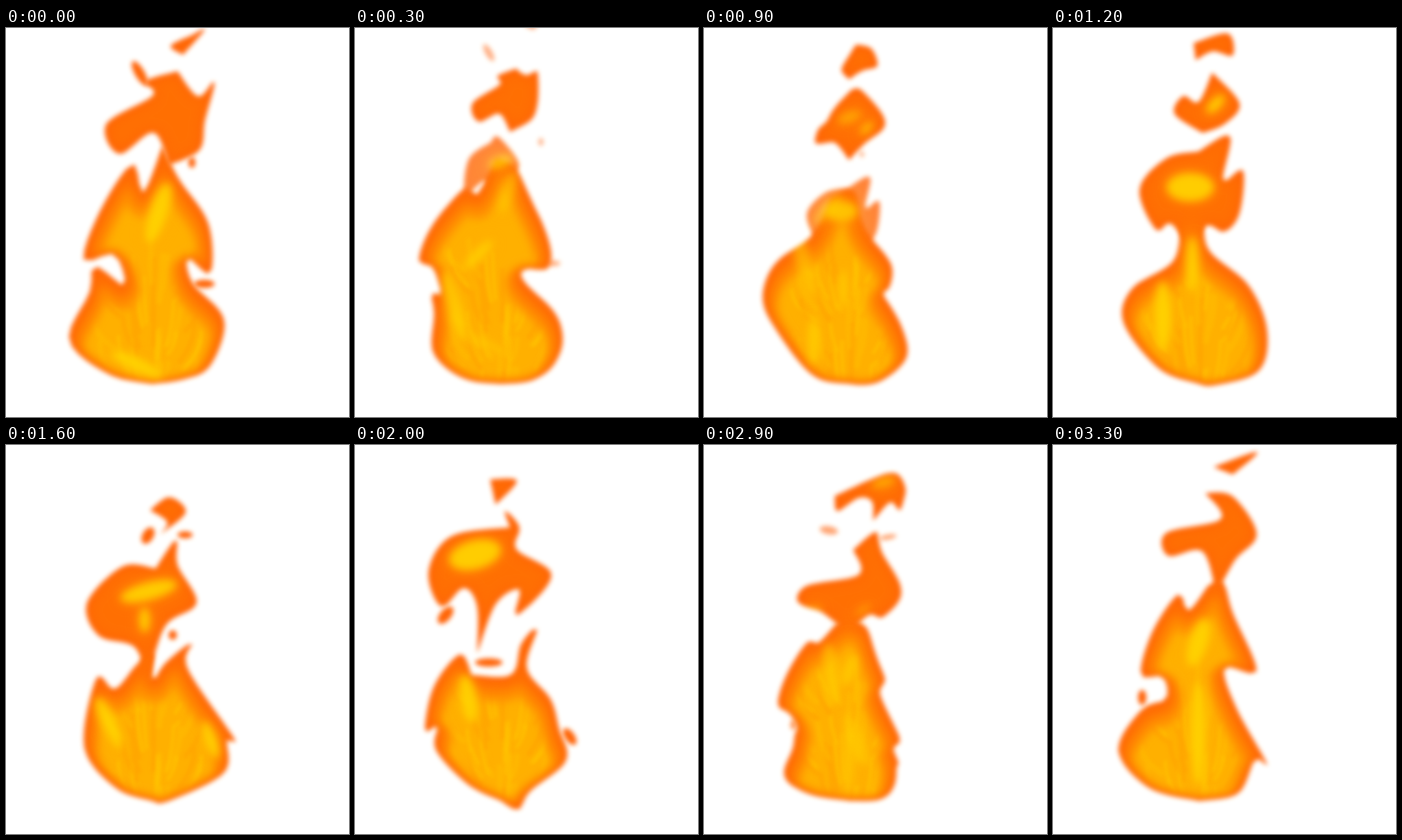
Recreate the animation shown at these times as an HTML page with a canvas. Size 500x567 px, loop 3.4 s.

```html
<!DOCTYPE html>
<html lang="en">
<head>
<meta charset="utf-8">
<title>Flame</title>
<style>
  html, body { margin: 0; width: 100%; height: 100%; overflow: hidden; background: #fff; }
  canvas { display: block; }
</style>
</head>
<body>
<canvas id="stage" width="500" height="567"></canvas>
<script>
const STEP = 100, COUNT = 34, SAMPLES = 48;
const FOOT = '213 519 ';
const stage = document.getElementById('stage');
const ctx = stage.getContext('2d');
const inner = document.createElement('canvas');
inner.width = stage.width;
inner.height = stage.height;
const ink = inner.getContext('2d');
const poses = [];

const numbers = text => text.trim().split(/\s+/).map(Number);

// Smooth curve through the points, resampled at even distances.
function sample(pts) {
  const line = [], last = pts.length - 1;
  for (let i = 0; i < last; i++) {
    const a = pts[Math.max(i - 1, 0)], b = pts[i], c = pts[i + 1], d = pts[Math.min(i + 2, last)];
    for (let k = 0; k < 8; k++) {
      const t = k / 8;
      line.push([0, 1].map(j => b[j] + t / 2 * (c[j] - a[j] +
        t * (2 * a[j] - 5 * b[j] + 4 * c[j] - d[j] + t * (3 * (b[j] - c[j]) + d[j] - a[j])))));
    }
  }
  line.push(pts[last]);
  const len = [0];
  for (let i = 1; i < line.length; i++)
    len.push(len[i - 1] + Math.hypot(line[i][0] - line[i - 1][0], line[i][1] - line[i - 1][1]));
  const out = [];
  for (let s = 0, i = 1; s < SAMPLES; s++) {
    const want = len[len.length - 1] * s / (SAMPLES - 1);
    while (i < len.length - 1 && len[i] < want) i++;
    const t = (want - len[i - 1]) / (len[i] - len[i - 1] || 1);
    out.push([0, 1].map(j => line[i - 1][j] + t * (line[i][j] - line[i - 1][j])));
  }
  return out;
}

// An outline runs from its foot up the left side to the tip, then | down to the foot again.
function outline(text) {
  const [left, right] = text.split('|').map(half => {
    const n = numbers(half), pts = [];
    for (let i = 0; i < n.length; i += 2) pts.push([n[i], n[i + 1]]);
    return pts;
  });
  return [...sample(left), ...sample([left[left.length - 1], ...right, left[0]])];
}

// Tilted oval: centre, radii, degrees.
function oval(text) {
  const [x, y, rx, ry, deg] = numbers(text), tilt = deg * Math.PI / 180;
  return Array.from({ length: 2 * SAMPLES }, (_, i) => {
    const a = Math.PI * i / SAMPLES, p = rx * Math.cos(a), q = ry * Math.sin(a);
    return [x + p * Math.cos(tilt) - q * Math.sin(tilt), y + p * Math.sin(tilt) + q * Math.cos(tilt)];
  });
}

// Parts that share a name in neighbouring poses morph into each other.
function pose(at, parts, bits, lights) {
  const body = {}, glow = {};
  for (const name in parts) body[name] = outline((name === 'base' ? FOOT : '') + parts[name]);
  bits.split(',').forEach((text, i) => { if (text) body[at + '/' + i] = oval(text); });
  lights.split(',').forEach((text, i) => { glow[at + '/' + i] = oval(text); });
  poses.push({ at, body, glow });
}

pose(0, {
  base: '150 505 92 455 122 385 126 348 144 355 174 376 158 330 113 338 138 265 184 198 200 240 228 172|252 220 295 285 298 358 265 335 272 372 318 425 298 492 260 512',
  low: '237 200 215 152 165 184 146 140 215 98 202 78 250 63|280 100 304 78 290 135 282 178',
  top: '258 39 240 26 272 10|290 2'
}, '271 196 5 8 0,289 373 15 6 0,195 66 7 20 -30', '222 270 13 45 18,190 490 40 10 25');

pose(6, {
  base: '155 512 98 432 70 375 85 310 140 264 184 208|222 195 240 260 272 325 245 364 216 362 265 410 294 460 262 513',
  mid: '205 232 186 195 145 222 152 150 198 115|214 104 257 162 222 195',
  low: '215 103 194 85 220 55|214 36 244 72'
}, '230 214 5 6 0', '145 370 15 75 -15,212 160 26 11 -20,180 295 12 40 45');

pose(12, {
  base: '155 497 103 430 115 380 175 340 186 285|216 280 228 325 285 375 312 440 300 500 235 521',
  top: '200 325 172 285 150 294 126 235 165 190 212 180|258 157 248 222 277 207 272 270 250 297 224 288',
  mid: '218 153 177 125 190 99 212 108 232 65|272 110 250 140',
  low: '208 47 205 22|255 8 262 40 233 34'
}, '', '160 420 12 50 0,203 345 8 40 0,200 232 34 20 0,237 111 17 7 -45');

pose(16, {
  base: '160 500 114 440 132 340 158 356 186 325|214 300 214 343 232 318 272 288 264 325 334 430 322 430 318 478 235 520',
  top: '205 348 188 295 135 278 118 230 170 177 218 180|248 138 250 175 278 230 235 260 215 310',
  mid: '225 130 235 112 210 95|238 76 262 98'
}, '207 132 8 13 30,261 131 11 5 0,243 277 6 7 0', '208 213 42 12 -15,202 255 7 18 0,150 405 10 40 -25,298 430 8 28 -20');

pose(20, {
  base: '165 495 118 445 120 410 102 416 115 352 153 305 170 335|228 335 242 290 266 267 250 325 285 370 297 412 308 460 255 505 238 532',
  top: '178 304 178 235 158 208 126 236 107 185 140 133 226 120|218 95 240 120 235 152 287 190 235 249 240 210 205 232',
  mid: '205 87 197 50|236 52'
}, '132 248 8 15 40,195 317 20 6 0,313 425 7 14 -35', '175 160 38 20 -15,165 370 12 35 -10');

pose(26, {
  base: '135 510 140 467 92 420 120 350 165 305|215 278 232 335 292 445 256 440 275 495 255 520',
  low: '190 317 125 305 118 268 212 250 214 215|244 165 245 205 285 275 256 314 232 292',
  top: '235 161 238 115 208 106 160 143 158 106|260 60 290 80 285 150 268 122'
}, '268 160 17 5 -10,182 150 18 8 10', '185 360 16 60 -5,222 455 16 55 -20,158 266 20 6 -8,232 266 18 4 -35,262 80 24 9 -15');

pose(33, {
  base: '140 500 95 445 130 385 165 370 160 338 128 335 145 272 183 217 197 242 226 205|248 200 262 245 297 330 250 325 268 385 313 467 295 458 270 508',
  low: '238 218 218 155 168 162 165 128 245 108 222 70|262 75 297 130 265 168',
  top: '262 43 234 32|298 10'
}, '130 368 6 11 0', '212 288 14 36 18,212 420 11 75 0');

function resize(pts, scale, dy) {
  const mid = [0, 1].map(j => pts.reduce((sum, p) => sum + p[j], 0) / pts.length);
  return pts.map(p => [mid[0] + (p[0] - mid[0]) * scale, mid[1] + (p[1] - mid[1]) * scale + dy]);
}

function toPath(pts) {
  const path = new Path2D();
  pts.forEach(p => path.lineTo(p[0], p[1]));
  path.closePath();
  return path;
}

// New parts swell up from below, leaving parts rise, shrink and fade.
function blend(from, to, u) {
  const parts = [];
  for (const name of new Set([...Object.keys(from), ...Object.keys(to)])) {
    const a = from[name], b = to[name];
    let pts, alpha = 1;
    if (a && b) pts = a.map((p, i) => [p[0] + (b[i][0] - p[0]) * u, p[1] + (b[i][1] - p[1]) * u]);
    else if (a) { pts = resize(a, 1 - 0.6 * u, -60 * u); alpha = 1 - u; }
    else { pts = resize(b, 0.4 + 0.6 * u, 70 * (1 - u)); alpha = Math.min(1, u * 1.6); }
    if (alpha > 0) parts.push({ name, alpha, path: toPath(pts) });
  }
  return parts;
}

function paint(parts, color, blur, strength = 1) {
  ctx.filter = `blur(${blur}px)`;
  ctx.fillStyle = color;
  for (const part of parts) {
    ctx.globalAlpha = part.alpha * strength;
    ctx.fill(part.path);
  }
}

// Brush marks that lean towards the foot and climb.
function brush(frame) {
  let seed = 7;
  const rnd = () => (seed = seed * 16807 % 2147483647) / 2147483647;
  ink.globalCompositeOperation = 'source-atop';
  ink.filter = 'blur(2.5px)';
  ink.globalAlpha = 0.28;
  ink.lineCap = 'round';
  ['#ffe600', '#ff9000', '#ffc800'].forEach((color, i) => {
    const marks = new Path2D();
    for (let k = 0; k < 15; k++) {
      const x = 213 + (rnd() - 0.5) * 170;
      const y = 290 + 200 * ((rnd() + 1 - frame * 2 / COUNT % 1) % 1);
      const size = 30 + 40 * rnd();
      marks.moveTo(x, y);
      marks.quadraticCurveTo(x, y + size / 2, x + (213 - x) * 0.35, y + size);
    }
    ink.strokeStyle = color;
    ink.lineWidth = 4 + 2 * i;
    ink.stroke(marks);
  });
}

// Fills a shape inset from its outline, lower at the foot so it stays bright there.
function paintInner(path, color, inset, blur, frame) {
  ink.save();
  ink.clearRect(0, 0, inner.width, inner.height);
  ink.translate(0, inset * 0.6);
  ink.fillStyle = color;
  ink.fill(path);
  if (frame !== undefined) brush(frame);
  ink.globalCompositeOperation = 'destination-out';
  ink.globalAlpha = 1;
  ink.filter = `blur(${blur}px)`;
  ink.lineJoin = 'round';
  ink.lineWidth = inset * 2;
  ink.strokeStyle = '#000';
  ink.stroke(path);
  ink.restore();
  ctx.filter = 'none';
  ctx.globalAlpha = 1;
  ctx.drawImage(inner, 0, 0);
}

function draw(frame) {
  let i = poses.length - 1;
  while (poses[i].at > frame) i--;
  const from = poses[i], to = poses[(i + 1) % poses.length];
  const u = (frame - from.at) / ((to.at || COUNT) - from.at);
  const body = blend(from.body, to.body, u), glow = blend(from.glow, to.glow, u);
  const base = body.find(part => part.name === 'base').path;

  ctx.globalCompositeOperation = 'source-over';
  ctx.clearRect(0, 0, stage.width, stage.height);
  paint(body, '#ff5c08', 3.5);
  ctx.globalCompositeOperation = 'source-atop';
  paint(body, '#ff7600', 10, 0.75);
  paintInner(base, '#ff9200', 13, 8);
  paintInner(base, '#ffb000', 23, 6, frame);
  paint(glow, '#ffa800', 10, 0.7);
  paint(glow, '#ffd800', 6, 0.85);
}

let shown = -1;
function tick() {
  const frame = Math.floor(performance.now() / STEP) % COUNT;
  if (frame !== shown) draw(shown = frame);
  requestAnimationFrame(tick);
}
tick();
</script>
</body>
</html>
```
